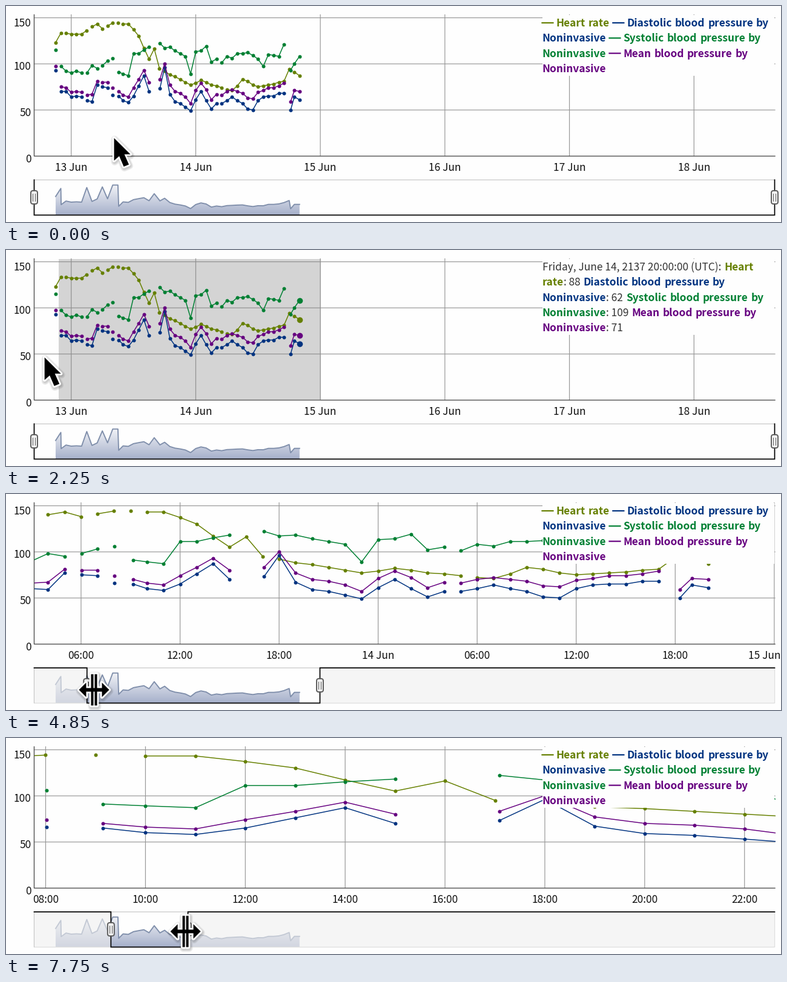
Write a matplotlib script that moves like this. It is 1280 px wide and 359 px high and loops after 8000 ms.

```python
import numpy as np
import matplotlib.pyplot as plt
from matplotlib.animation import FuncAnimation
from matplotlib.colors import LinearSegmentedColormap
from matplotlib.patches import FancyBboxPatch, PathPatch, Polygon, Rectangle
from matplotlib.path import Path
from matplotlib.transforms import Affine2D

W, H, DPI, STEP, LOOP = 1280, 359, 100, 50, 8000
PT = 72 / DPI  # points per pixel
FONT = ["Noto Sans CJK JP", "DejaVu Sans"]
LEFT, RIGHT, TOP, BOTTOM = 46, 1269.5, 14, 249
STRIP_TOP, STRIP_BOTTOM, STRIP_RIGHT = 288.5, 347, 1269
LEGEND_X, LEGEND_WRAP, LINE_H = 885, 1266, 25.3
FULL = (-7.14, 135.6)  # hours since 13 Jun 00:00
ZOOM_TIME = 2400

NAMES = ["Heart rate"] + [f"{kind} blood pressure by Noninvasive"
                          for kind in ("Diastolic", "Systolic", "Mean")]
COLORS = ["#668000", "#003380", "#008033", "#660080"]

# Hours at which blood pressure was logged a little after the heart rate.
LATE = {-2: .06, 3: .02, 6: .02, 8: .02, 9: .15, 17: .085, 29: .02, 42: .28}

rng = np.random.default_rng(7)


def hourly(turns, wander):
    """Hourly values through (hour, value) turning points, wandering in between."""
    hours = np.arange(-3, 45)
    at, values = np.transpose(turns)
    noise = np.where(np.isin(hours, at), 0, rng.normal(0, wander, hours.size))
    return np.round(np.interp(hours, at, values) + noise)


def build_rows():
    heart = hourly([(-3, 124), (-2, 134), (2, 133), (5, 144), (6, 139), (8, 145), (11, 144),
                    (13, 131), (15, 106), (16, 117), (17, 96), (23, 78), (25, 83), (31, 72),
                    (33, 84), (36, 76), (41, 82), (42, 95), (44, 88)], .8)
    diastolic = hourly([(-3, 94), (-2, 71), (4, 60), (5, 78), (11, 59), (14, 88), (15, 71),
                        (17, 74), (18, 97), (19, 68), (23, 50), (25, 71), (27, 52), (31, 65),
                        (35, 51), (36, 61), (41, 69), (42, 51), (43, 65), (44, 62)], 2)
    systolic = hourly([(-3, 116), (-2, 98), (3, 91), (8, 107), (9, 92), (11, 88), (12, 112),
                       (17, 123), (22, 109), (23, 90), (24, 114), (26, 120), (27, 103),
                       (34, 113), (37, 98), (38, 111), (40, 109), (41, 122), (42, 94),
                       (44, 109)], 2)
    mean = np.round(diastolic + .2 * (systolic - diastolic))
    for readings in (diastolic, systolic, mean):
        readings[16 + 3] = np.nan
    rows = []
    for hour, *values in zip(range(-3, 45), heart, diastolic, systolic, mean):
        if hour in LATE:
            rows.append((hour, values[0], np.nan, np.nan, np.nan))
            rows.append((hour + LATE[hour], np.nan, *values[1:]))
        else:
            rows.append((hour, *values))
    return np.array(rows)


ROWS = build_rows()
HOURS, VALUES = ROWS[:, 0], ROWS[:, 1:]


def value_y(value):
    return 250.4 - 1.535 * value


def hour_x(hour, view):
    return LEFT + (hour - view[0]) / (view[1] - view[0]) * (RIGHT - LEFT)


def x_hour(x, view):
    return view[0] + (x - LEFT) / (RIGHT - LEFT) * (view[1] - view[0])


# Pointer moves: start, end, target x, target y, cursor kind
MOVES = [
    (0, 200, 163, 224, "arrow"), (200, 850, 277, 207, "arrow"),
    (850, 1500, 519, 180, "arrow"), (1500, 2300, 58, 178, "arrow"),
    (2700, 3150, 312, 258, "arrow"), (3150, 3350, 260, 288, "arrow"),
    (3350, 3550, 183, 327, "move"), (3550, 3850, 58, 324, "move"),
    (3850, 4350, 64, 325, "resize"), (4550, 5020, 179.3, 325, "resize"),
    (5500, 6350, 455, 322, "move"), (6350, 6850, 518, 316, "move"),
    (6850, 6950, 522, 317, "resize"), (7150, 7550, 304, 323, "resize"),
    (7650, 7750, 296, 321, "resize")]


def ease(u):
    u = min(max(u, 0), 1)
    return u * u * (3 - 2 * u)


def cursor_at(t):
    x, y, kind = 178, 219, "arrow"
    for start, end, to_x, to_y, move_kind in MOVES:
        if t < start:
            break
        u = ease((t - start) / (end - start))
        x, y, kind = x + (to_x - x) * u, y + (to_y - y) * u, move_kind
    return x, y, kind


def dragged_x(t, start, end, lag):
    """Pointer x during a drag, trailing by the lag and held outside it."""
    return cursor_at(min(max(t - lag, start), end))[0]


def view_at(t):
    if t < ZOOM_TIME:
        return FULL
    return (x_hour(dragged_x(t, 4550, 5500, 15) - 5.5, FULL),
            x_hour(dragged_x(t, 7150, 7600, 15) - 3, FULL))


def hovered_row(t, x, y, view):
    if y > 286 or not (50 <= t < ZOOM_TIME or 2750 <= t < 3550):
        return None
    if 1500 <= t < ZOOM_TIME:
        return len(ROWS) - 1
    return int(np.argmin(abs(HOURS - x_hour(x, view))))


fig = plt.figure(figsize=(W / DPI, H / DPI), dpi=DPI, facecolor="#fefefe")
ax = fig.add_axes([0, 0, 1, 1])
ax.axis("off")
plot_clip = Rectangle((LEFT, TOP), RIGHT - LEFT + .5, BOTTOM - TOP, transform=ax.transData)


def line(xs=(), ys=(), color="black", width=1.0, z=2, **kw):
    return ax.plot(xs, ys, color=color, lw=width * PT, zorder=z, snap=False, **kw)[0]


def label(x=0, y=0, text="", **kw):
    kw = {"fontsize": 17.3 * PT, "family": FONT, "color": "#111111", "zorder": 8,
          "va": "baseline", **kw}
    return ax.text(x, y, text, **kw)


# Chart frame
GRID = {"color": "#989898", "width": 1.2}
for value in (0, 50, 100, 150):
    grid_y = BOTTOM - value * 1.533
    label(41, max(grid_y, 23) + 10, str(value), ha="right")
    if value:
        line((LEFT, RIGHT), (grid_y, grid_y), **GRID)
line((LEFT, LEFT, RIGHT), (TOP, BOTTOM, BOTTOM), "#505050", 1.4, 3)
grid = [line(**GRID) for _ in range(16)]
ticks = [label(y=274, ha="center") for _ in range(16)]

series, spots = [], []
for color in COLORS:
    series.append(line(color=color, width=1.5, z=4, marker="o", ms=6 * PT, mew=0))
    series[-1].set_clip_path(plot_clip)
    spots.append(line(color=color, z=5, marker="o", ms=9.6 * PT, mew=0))
band = ax.add_patch(Rectangle((0, TOP), 0, BOTTOM - TOP, fc="#808080", alpha=.33, lw=0, zorder=3))

# Legend
legend_box = ax.add_patch(Rectangle((LEGEND_X, TOP), 1268 - LEGEND_X, 0, fc="#fefefe", lw=0, zorder=7))
words = [label() for _ in range(26)]
dashes = [line(width=2.2, z=8) for _ in COLORS]

# Range selector: a profile of the mean of all readings
keep = np.diff(HOURS, prepend=-9) > .05
mini_x = hour_x(HOURS, FULL)[keep]
mini_y = 371.6 - .514 * np.nanmean(VALUES, axis=1)[keep]
outline = Polygon([(mini_x[0], STRIP_BOTTOM), *zip(mini_x, mini_y), (mini_x[-1], STRIP_BOTTOM)],
                  transform=ax.transData)
shade = ax.imshow(np.linspace(0, 1, 64)[:, None], aspect="auto", zorder=2,
                  extent=(LEFT, RIGHT, STRIP_BOTTOM, STRIP_TOP),
                  cmap=LinearSegmentedColormap.from_list("shade", ["white", "#a7b1cb"]))
shade.set_clip_path(outline)
line(mini_x, mini_y, color="#808fab", width=1.9, z=3)
ax.add_patch(Rectangle((LEFT, STRIP_TOP), STRIP_RIGHT - LEFT, STRIP_BOTTOM - STRIP_TOP,
                       fill=False, ec="#c4c4c4", lw=1.2 * PT, zorder=3, snap=False))
veils = [ax.add_patch(Rectangle((LEFT, STRIP_TOP), 0, STRIP_BOTTOM - STRIP_TOP,
                                fc="#f0f0f0", alpha=.6, lw=0, zorder=4)) for _ in range(2)]
bracket = line(width=1.7, z=5, solid_joinstyle="miter")


def make_handle():
    box = FancyBboxPatch((-5.5, 306.5), 11, 22, boxstyle="round,pad=0,rounding_size=3.5",
                         fc="#f2f2f2", ec="#5a5a5a", lw=1.9 * PT, zorder=6)
    bars = [Rectangle((x, 311), 1.6, 13, fc="#5a5a5a", lw=0, zorder=6) for x in (-2.8, 1.2)]
    return [ax.add_patch(p) for p in (box, *bars)]


handles = [make_handle(), make_handle()]


# Cursor
def closed(points):
    return Path([*points, points[0]], closed=True)


def turn(points, quarters):
    for _ in range(quarters):
        points = [(-y, x) for x, y in points]
    return points


ARROW = closed([(0, 0), (0, 37.5), (8.5, 30), (16, 47.5), (24.5, 44), (17, 27), (27, 27)])
upper = [(-25, 0), (-13, -12), (-13, -3), (-5, -3), (-5, -26), (-1, -26), (-1, -3)]
upper += [(-x, y) for x, y in upper[::-1]]
RESIZE = closed(upper + [(x, -y) for x, y in upper[-2:0:-1]])
arm = [(3.5, -3.5), (15, -3.5), (15, -11), (26, 0), (15, 11), (15, 3.5)]
MOVE = closed(sum((turn(arm, k) for k in range(4)), []))
DIAMOND = closed(turn([(27, 0)], 0) + turn([(27, 0)], 1) + turn([(27, 0)], 2) + turn([(27, 0)], 3))
SHAPES = {"arrow": (ARROW, ARROW), "resize": (RESIZE, RESIZE), "move": (MOVE, DIAMOND)}


def cursor_layer(color, width, alpha, z):
    return ax.add_patch(PathPatch(ARROW, fc=color, ec=color, lw=width * PT, alpha=alpha,
                                  zorder=z, joinstyle="round"))


shadows = [cursor_layer("black", width, .07, 20) for width in (6, 9, 12)]
halo = cursor_layer("white", 5.5, 1, 21)
body = cursor_layer("black", 0, 1, 22)


def draw_cursor(x, y, kind):
    shape, back = SHAPES[kind]
    for patch in (*shadows, halo, body):
        shift = 2 if patch in shadows else 0
        patch.set_path(shape if patch is body else back)
        patch.set_transform(Affine2D().translate(x + shift / 2, y + shift) + ax.transData)


def draw_ticks(view):
    per_hour = (RIGHT - LEFT) / (view[1] - view[0])
    step = next(s for s in (1, 2, 6, 24) if s * per_hour >= 105)
    first = int(np.ceil(view[0] / step)) * step
    for k, (rule, text) in enumerate(zip(grid, ticks)):
        hour = first + k * step
        shown = hour <= view[1] + .08
        rule.set_visible(shown)
        text.set_visible(shown)
        x = min(hour_x(hour, view), RIGHT)
        rule.set_data((x, x), (TOP, BOTTOM))
        day, clock = divmod(hour, 24)
        text.set_text(f"{clock:02d}:00" if clock else f"{13 + day} Jun")
        text.set_x(min(x, 1252))


def stamp(hour):
    day, minute = divmod(int(round(hour * 60)), 1440)
    weekday = ("Wednesday", "Thursday", "Friday")[day + 1]
    return f"{weekday}, June {13 + day}, 2137 {minute // 60:02d}:{minute % 60:02d}:00 (UTC):"


def legend_tokens(row):
    """Tokens as (gap before, text or None for a dash, colour, weight)."""
    tokens = [] if row is None else [(0, stamp(HOURS[row]), "#333333", "normal")]
    for k, (name, color) in enumerate(zip(NAMES, COLORS)):
        if row is None:
            tokens.append((5.5, None, color, "bold"))
        elif np.isnan(VALUES[row, k]):
            continue
        tokens += [(5, word, color, "bold") for word in name.split()]
        if row is not None:
            tokens.append((0, f": {VALUES[row, k]:.0f}", "#333333", "normal"))
    return tokens


def draw_legend(row):
    for artist in words + dashes:
        artist.set_visible(False)
    free_words, free_dashes = iter(words), iter(dashes)
    x, n = LEGEND_X, 0
    for gap, text, color, weight in legend_tokens(row):
        artist = next(free_dashes if text is None else free_words)
        artist.set(visible=True, color=color)
        width = 18
        if text is not None:
            artist.set(text=text, fontweight=weight)
            width = artist.get_window_extent().width
        if x > LEGEND_X:
            if gap and x + gap + width > LEGEND_WRAP:
                x, n = LEGEND_X, n + 1
            else:
                x += gap
        if text is None:
            artist.set_data((x, x + width), (27.5 + n * LINE_H,) * 2)
        else:
            artist.set_position((x, 33.5 + n * LINE_H))
        x += width
    legend_box.set_height((n + 1) * LINE_H)


def draw_selector(view):
    if view == FULL:
        a, b = LEFT, STRIP_RIGHT
    else:
        a, b = (hour_x(h, FULL) - 1 for h in view)
    bracket.set_data((LEFT, a, a, b, b, STRIP_RIGHT),
                     (STRIP_TOP, STRIP_TOP, STRIP_BOTTOM, STRIP_BOTTOM, STRIP_TOP, STRIP_TOP))
    veils[0].set_width(a - LEFT)
    veils[1].set_x(b)
    veils[1].set_width(STRIP_RIGHT - b)
    for parts, x in zip(handles, (a, b)):
        for part in parts:
            part.set_transform(Affine2D().translate(x, 0) + ax.transData)


def draw(frame):
    t = frame * STEP
    view = view_at(t)
    x, y, kind = cursor_at(t)
    row = hovered_row(t, x, y, view)
    plot_x = hour_x(HOURS, view)
    for k in range(len(COLORS)):
        series[k].set_data(plot_x, value_y(VALUES[:, k]))
        spots[k].set_visible(row is not None)
        if row is not None:
            spots[k].set_data([plot_x[row]], [value_y(VALUES[row, k])])
    edge = dragged_x(t, 1500, 2350, 70)
    band.set_visible(1650 <= t < ZOOM_TIME)
    band.set_x(edge)
    band.set_width(519 - edge)
    draw_ticks(view)
    draw_legend(row)
    draw_selector(view)
    draw_cursor(x, y, kind)
    return []


# Whole coordinates fall on pixel centres.
ax.set_xlim(-.5, W - .5)
ax.set_ylim(H - .5, -.5)
animation = FuncAnimation(fig, draw, frames=LOOP // STEP, interval=STEP, repeat=True,
                          init_func=lambda: draw(0))
plt.show()
```
